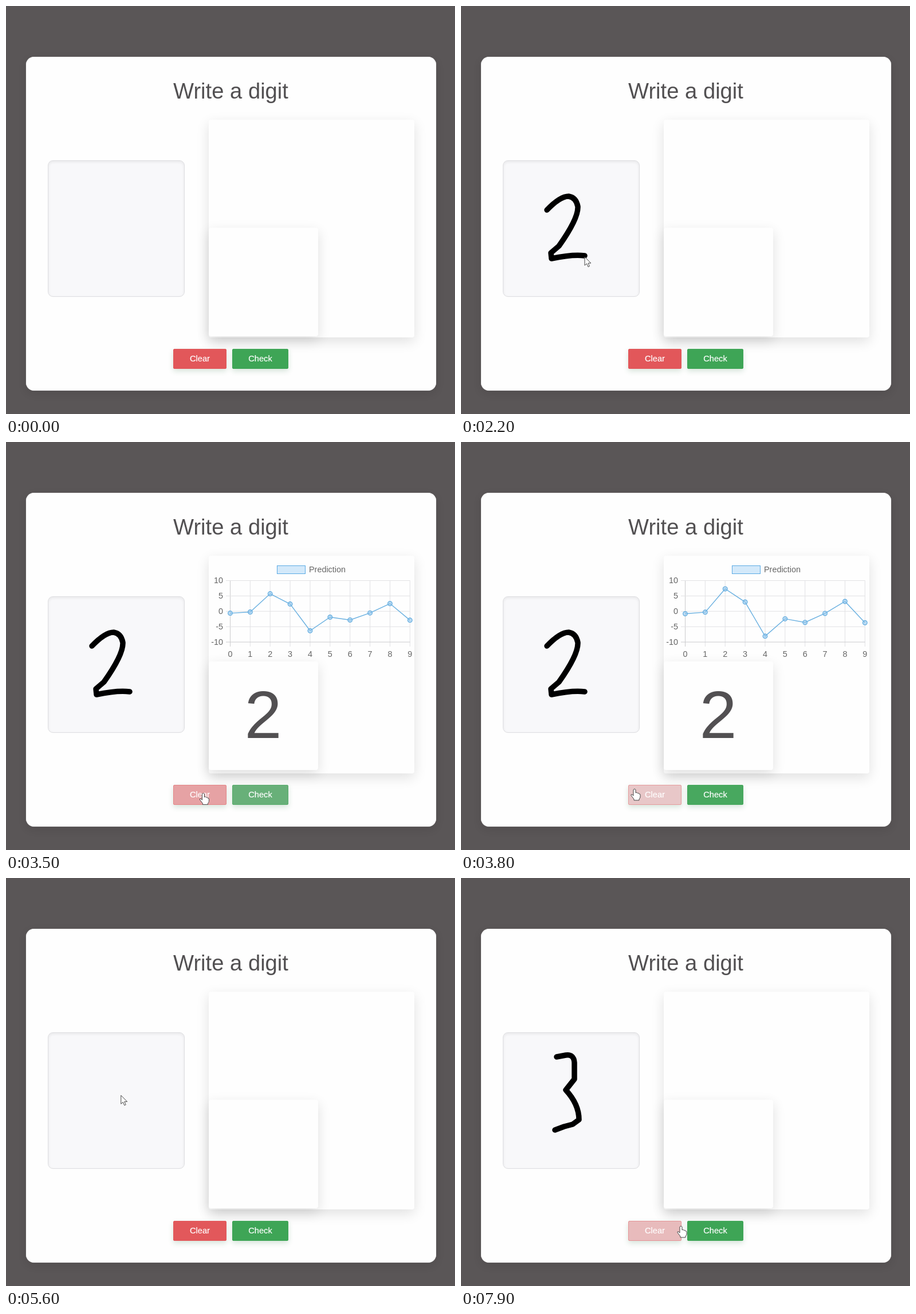
An HTML page for the animation above (8000 ms loop, 784 px wide and 714 px high).

```html
<!DOCTYPE html>
<html lang="en">
<head>
<meta charset="utf-8">
<title>Write a digit</title>
<style>
html, body { margin: 0; width: 100%; height: 100%; overflow: hidden; background: #5a5657; }
body { position: relative; font-family: "Liberation Sans", Arial, sans-serif; }
div, svg { position: absolute; box-sizing: border-box; }
svg { left: 0; top: 0; }
#card { left: 35px; top: 89px; width: 716px; height: 584px; border-radius: 14px; background: #fefefe; box-shadow: 0 0 1px #fefefe, 0 5px 15px rgba(0,0,0,.1); }
#pad { left: 73px; top: 270px; width: 239px; height: 239px; border-radius: 9px; background: #f8f8fa; border: 1px solid #dedee1; box-shadow: inset 0 2px 5px rgba(0,0,0,.07); }
.panel { left: 354px; border-radius: 4px; background: #fefefe; box-shadow: 0 7px 22px rgba(0,0,0,.12); }
#out { top: 199px; width: 359px; height: 381px; }
#guess { width: 191px; height: 190px; }
.btn { top: 600px; height: 35px; border-radius: 2px; border: 1px solid; box-shadow: 0 4px 10px rgba(40,110,60,.18); color: #fff; font-size: 14.6px; line-height: 33px; text-align: center; -webkit-text-stroke: .2px; }
#clear { left: 292px; width: 93px; }
#check { left: 395px; width: 98px; }
</style>
</head>
<body>
<div id="card"></div>
<div id="pad"></div>
<div id="out" class="panel"></div>
<div id="guess" class="panel"></div>
<div id="clear" class="btn">Clear</div>
<div id="check" class="btn">Check</div>
<svg width="784" height="714">
  <text x="392.5" y="162" font-size="38.2" text-anchor="middle" fill="#525052">Write a digit</text>
  <g id="result" fill="#666" font-size="14.4">
    <rect x="473.5" y="216.5" width="49" height="14" fill="#d3e9fa" stroke="#5aaae4"/>
    <text x="529" y="228">Prediction</text>
    <g id="grid" stroke-width="1"></g>
    <g id="plot" stroke="#6ab0e0" stroke-width="1.4"></g>
    <text x="449" y="518" font-size="117" text-anchor="middle" fill="#525052">2</text>
  </g>
  <g fill="none" stroke="#000" stroke-width="9.5" stroke-linecap="round" stroke-linejoin="round">
    <path id="two" d="M150 357Q173 333 188 333Q201 335 204 351Q205 372 171 420L157 432L158 442Q196 434 216 437"/>
    <path id="three" d="M167 313L183 310Q197 308 198 323V352L183 371Q206 396 206 423L195 431L180 435L164 441"/>
  </g>
  <g id="cursor" fill="#fff" stroke="#444" stroke-linejoin="round">
    <path id="arrow" d="M0 0V15L3.5 11.8L6 17.5L8.4 16.4L6 11H10.8Z"/>
    <path id="hand" d="M-3 1.5Q-1-1.5 1 1.5V7Q3 5.2 4.3 7.6Q6.4 6.4 7.2 9Q9 8.4 9 10.5V14Q9 16 7 18V20H-2V18L-7 11.5Q-7.5 9-5 10L-3 12Z"/>
  </g>
</svg>
<script>
const $ = id => document.getElementById(id);
const LOOP = 8000, SHOW = 3200, WIPE = 5000, THREE = 6250;
const clamp = u => Math.max(0, Math.min(1, u));
const smooth = u => u * u * (3 - 2 * u);
const mix = (a, b, u) => a.map((v, i) => v + (b[i] - v) * u);
const show = (id, on) => $(id).style.display = on ? "" : "none";
const make = (parent, tag, attrs, text = "") => {
  const el = document.createElementNS("http://www.w3.org/2000/svg", tag);
  for (const k in attrs) el.setAttribute(k, attrs[k]);
  el.textContent = text;
  return parent.appendChild(el);
};

// Chart
const values = [-.8, -.3, 7.5, 3.1, -8.3, -2.5, -3.7, -.7, 3.3, -3.8];
const px = i => 391.5 + 34.87 * i, py = v => 296.3 - 5.38 * v;
const rule = (d, axis) => make($("grid"), "path", { d, stroke: axis ? "#cbcbce" : "#e1e1e4" });
const label = (x, y, anchor, text) => make($("grid"), "text", { x, y, "text-anchor": anchor }, text);
for (let i = 0; i < 10; i++) {
  rule(`M${px(i)} 242.5V358`, i === 0);
  label(px(i), 375.5, "middle", i);
}
for (let v = -10; v <= 10; v += 5) {
  rule(`M384 ${py(v)}H705.5`, v === -10);
  label(379, py(v) + 4.5, "end", v);
}
const line = make($("plot"), "polyline", { fill: "none" });
const dots = values.map((v, i) => make($("plot"), "circle", { cx: px(i), r: 3.8, fill: "#8cc5ee", "fill-opacity": .55 }));

// A pen stroke drawn from start to end; power shapes its pace
function pen(id, start, end, power) {
  const path = $(id), len = path.getTotalLength();
  const at = t => len * clamp((t - start) / (end - start)) ** power;
  return {
    draw(t, until) {
      show(id, t >= start && t < until);
      path.setAttribute("stroke-dasharray", `${at(t)} ${len + 20}`);
    },
    tip(t) {
      const p = path.getPointAtLength(at(t + 50));
      return [p.x, p.y + 2];
    }
  };
}
const two = pen("two", 1000, 2150, .7), three = pen("three", THREE, 7300, 1.43);

// Cursor legs: start, end, destination
const toButtons = [[2200, 2600, [443, 632]], [3150, 3700, [304, 607]], [4300, 5000, [318, 607]], [5150, 5800, [167, 315]]];
const toClear = [[7400, 7850, [385, 609]]];
const travel = (from, legs, t) =>
  legs.reduce((p, [a, b, to]) => mix(p, to, smooth(clamp((t - a) / (b - a)))), from);
const pointer = t => t < THREE ? travel(two.tip(t), toButtons, t) : travel(three.tip(t), toClear, t);

// Buttons fade towards a pale tone while hovered
const decay = ms => Math.exp(-Math.max(0, ms) / 216);
const hover = (t, enter, leave) => (1 - decay(Math.min(t, leave) - enter)) * decay(t - leave);
function tint(id, base, pale, u) {
  $(id).style.background = `rgb(${mix(base, pale, u)})`;
  $(id).style.borderColor = `rgb(${mix(base, pale, u * .6)})`;
}

function render(t) {
  const shown = t >= SHOW && t < WIPE;
  show("result", shown);
  $("guess").style.top = shown ? "384px" : "388px";
  const grow = 1 - (1 - clamp((t - SHOW) / 1000)) ** 4;
  const ys = values.map(v => py(v * grow));
  line.setAttribute("points", ys.map((y, i) => `${px(i)},${y}`).join(" "));
  dots.forEach((dot, i) => dot.setAttribute("cy", ys[i]));

  two.draw(t, WIPE);
  three.draw(t, LOOP);
  tint("clear", [226, 87, 90], [233, 211, 212], hover(t, 3300, 4600) + hover(t, 7550, LOOP));
  tint("check", [62, 165, 86], [171, 194, 177], hover(t, 2500, 3300));

  const [x, y] = pointer(t), over = y > 599 && y < 636 && x > 291 && x < 494;
  show("cursor", t >= 900);
  $("cursor").setAttribute("transform", `translate(${x} ${y})`);
  show("arrow", !over);
  show("hand", over);
}
function frame() {
  render(performance.now() % LOOP);
  requestAnimationFrame(frame);
}
frame();
</script>
</body>
</html>
```
